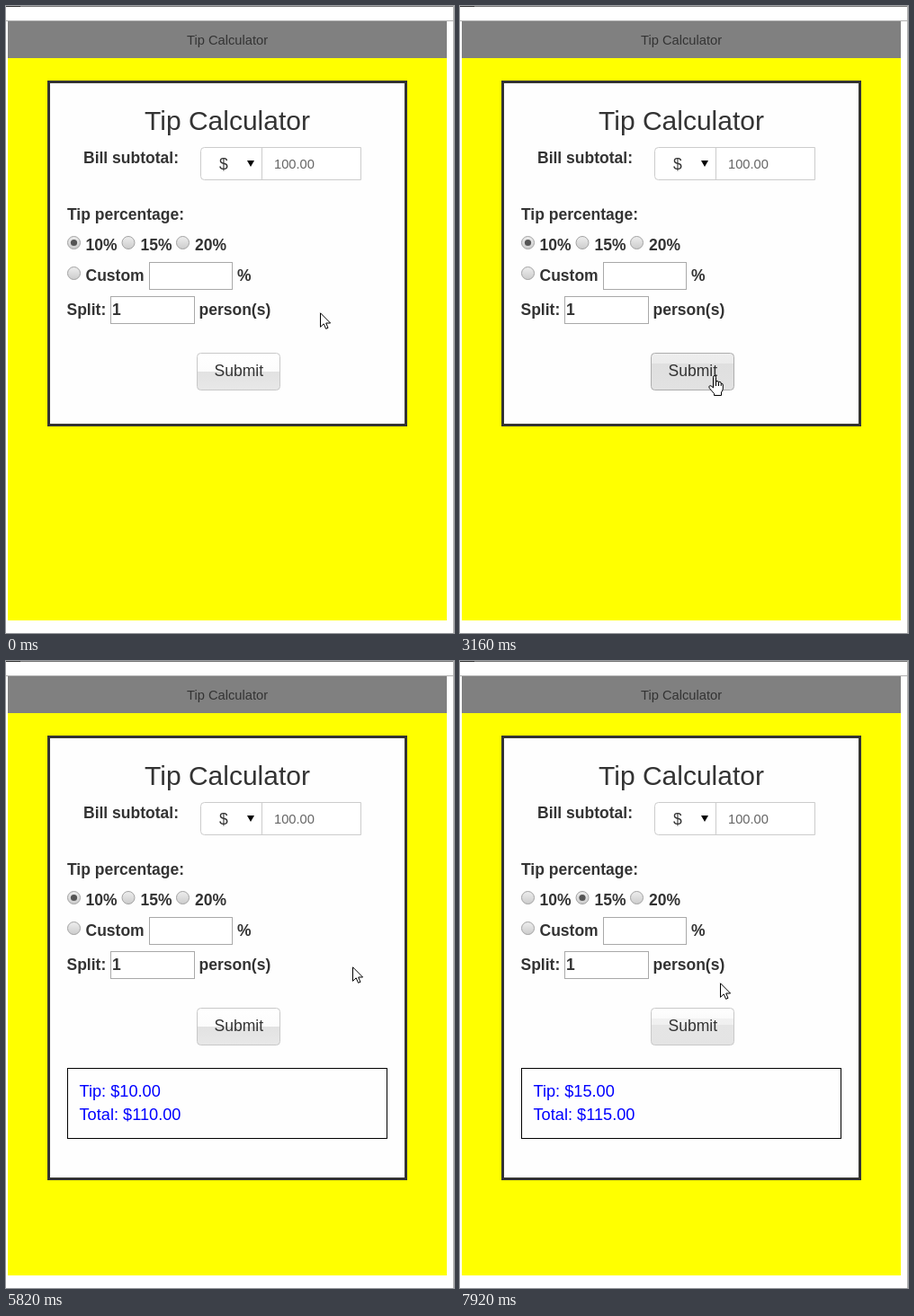
Write an HTML page that moves like this. It is 498x698 px and loops after 8 s.

```html
<!DOCTYPE html>
<html lang="en">
<head>
<meta charset="utf-8">
<title>Tip Calculator</title>
<style>
  html, body { margin: 0; width: 100%; height: 100%; overflow: hidden; background: #fff; }
  svg { display: block; width: 100%; height: 100%; }
  text { font: 17.5px "Liberation Sans", Arial, sans-serif; fill: #333; }
  .bold { font-weight: bold; }
  .small { font-size: 14.7px; }
  .title { font-size: 30px; }
  .result text { font-size: 18.2px; fill: #00f; }
  .mid { text-anchor: middle; }
  .field { fill: #fff; stroke: #a9a9a9; }
  .cursor { fill: #fff; stroke: #000; stroke-linejoin: round; }
</style>
</head>
<body>
<svg viewBox="0 0 498 698">
  <defs>
    <linearGradient id="normal" x2="0" y2="1">
      <stop offset="0" stop-color="#fff"/><stop offset=".5" stop-color="#fcfcfc"/>
      <stop offset=".5" stop-color="#e2e2e2"/><stop offset="1" stop-color="#e8e8e8"/>
    </linearGradient>
    <linearGradient id="hover" x2="0" y2="1">
      <stop offset="0" stop-color="#eee"/><stop offset=".28" stop-color="#ebebeb"/>
      <stop offset=".28" stop-color="#dfdfdf"/><stop offset="1" stop-color="#e2e2e2"/>
    </linearGradient>
    <linearGradient id="fading" x2="0" y2="1">
      <stop offset="0" stop-color="#fff"/><stop offset=".27" stop-color="#fafafa"/>
      <stop offset=".27" stop-color="#f1f1f1"/><stop offset=".45" stop-color="#f0f0f0"/>
      <stop offset=".45" stop-color="#e5e5e5"/><stop offset="1" stop-color="#e4e4e4"/>
    </linearGradient>
    <linearGradient id="pressed" x2="0" y2="1">
      <stop offset="0" stop-color="#c4c4c4"/><stop offset=".15" stop-color="#d8d8d8"/>
      <stop offset="1" stop-color="#dcdcdc"/>
    </linearGradient>
    <linearGradient id="knob" x2="0" y2="1">
      <stop offset="0" stop-color="#eee"/><stop offset="1" stop-color="#ccc"/>
    </linearGradient>
  </defs>

  <rect width="498" height="698" fill="#fff"/>
  <path d="M0 .5H498" stroke="#777"/>
  <path d="M0 .5H16" stroke="#333"/>
  <path d="M0 16.5H498M497.5 0V698" stroke="#b0b0b0"/>
  <rect x="2" y="17" width="488" height="667" fill="#ff0"/>
  <rect x="2" y="17" width="488" height="41" fill="#808080"/>
  <text class="small mid" x="246" y="43">Tip Calculator</text>

  <rect id="card" x="47.5" y="84.5" width="397" fill="#fefefe" stroke="#333" stroke-width="3"/>
  <text class="title mid" x="246" y="138">Tip Calculator</text>
  <text class="bold" x="86" y="175">Bill subtotal:</text>
  <path d="M394.5 157.5H220.5a4 4 0 0 0-4 4V189.5a4 4 0 0 0 4 4H394.5zM284.5 157.5V193.5" fill="#fff" stroke="#ccc"/>
  <text x="237" y="182">$</text>
  <path d="M268 172H276L272 179z"/>
  <text class="small" x="298" y="181" style="fill:#666">100.00</text>

  <text class="bold" x="68" y="238">Tip percentage:</text>
  <g id="radios"></g>
  <text class="bold" x="88.5" y="272">10%</text>
  <text class="bold" x="149.5" y="272">15%</text>
  <text class="bold" x="210" y="272">20%</text>
  <text class="bold" x="88.5" y="306">Custom</text>
  <rect class="field" x="159.5" y="285.5" width="92" height="30"/>
  <text class="bold" x="257" y="306">%</text>
  <text class="bold" x="67.5" y="344">Split:</text>
  <rect class="field" x="116.5" y="323.5" width="93" height="30"/>
  <text class="bold" x="118" y="344">1</text>
  <text class="bold" x="214.5" y="344">person(s)</text>

  <rect id="glow" x="212" y="386" width="93" height="42.5" rx="4" fill="none" stroke="#9dbdf2" stroke-width="2.4"/>
  <rect id="button" x="212.5" y="386.5" width="92" height="41" rx="4"/>
  <text class="mid" x="258.8" y="412">Submit</text>

  <g class="result" id="result">
    <rect x="68.5" y="453.5" width="355" height="78" fill="none" stroke="#000"/>
    <text id="tip" x="81.5" y="485"></text>
    <text id="total" x="81.5" y="511"></text>
  </g>

  <g id="cursor">
    <path class="cursor" id="arrow" d="M.5.8V16.3L4.2 12.8 6.6 18.3 9 17.3 6.7 12H11.6z"/>
    <path class="cursor" id="hand" d="M5.5 14V2.2Q5.5.5 7 .5T8.5 2.2V8Q8.5 6.5 10 6.5T11.5 8.2Q11.7 7.3 12.8 7.3 14.2 7.4 14.2 9.3 16.3 8.8 16.3 11V15Q16.2 17 14.5 19V22.5H6.5V20.5L1.3 14.5Q.2 12.6 1.5 11.8 2.8 11.3 4 12.6zM8.5 8V12M11.5 8.2V12M14.2 9.3V12"/>
    <path id="ibeam" d="M0 .5H3M4 .5H7M3.5 1V15M0 15.5H3M4 15.5H7" stroke="#000"/>
  </g>
</svg>
<script>
const $ = id => document.getElementById(id);
const LOOP = 8000;

// time, cursor x, cursor y, cursor shape, button state
const path = [
  [0, 349, 341, 'arrow', 'normal'],
  [1490, 346, 341, 'arrow', 'normal'],
  [1890, 345, 343, 'arrow', 'normal'],
  [2330, 334, 280, 'arrow', 'normal'],
  [2480, 329, 264, 'arrow', 'normal'],
  [2750, 311, 338, 'arrow', 'normal'],
  [2880, 285, 398, 'hand', 'hover'],
  [3030, 279, 407, 'hand', 'hover'],
  [3160, 276, 411, 'hand', 'hover'],
  [3430, 276, 411, 'hand', 'pressed'],
  [3550, 281, 404, 'hand', 'focus'],
  [3700, 380, 351, 'arrow', 'focus'],
  [3830, 392, 343, 'arrow', 'normal'],
  [5820, 385, 340, 'arrow', 'normal'],
  [5950, 274, 315, 'arrow', 'normal'],
  [6100, 208, 280, 'arrow', 'normal'],
  [6230, 174, 268, 'arrow', 'normal'],
  [6500, 144, 268, 'arrow', 'normal'],
  [6660, 142, 268, 'arrow', 'normal'],
  [6930, 150, 270, 'arrow', 'normal'],
  [7050, 181, 282, 'ibeam', 'normal'],
  [7200, 264, 368, 'arrow', 'normal'],
  [7360, 250, 393, 'hand', 'hover'],
  [7510, 245, 399, 'hand', 'hover'],
  [7650, 245, 399, 'hand', 'pressed'],
  [7770, 245, 399, 'hand', 'focus'],
  [7920, 289, 358, 'arrow', 'fading']
];

$('radios').innerHTML = [[75.5, 263.5], [136, 263.5], [196.5, 263.5], [75.5, 297.5]].map(([x, y]) =>
  `<g><circle cx="${x}" cy="${y}" r="7" fill="url(#knob)" stroke="#a2a2a2"/>
  <circle cx="${x}" cy="${y}" r="3.6" fill="#555"/></g>`).join('');
const radios = [...$('radios').children];

const show = (el, on) => el.setAttribute('visibility', on ? 'visible' : 'hidden');

function draw(t) {
  const [, x, y, shape, state] = path.findLast(step => step[0] <= t);
  $('cursor').setAttribute('transform', `translate(${x} ${y})`);
  for (const name of ['arrow', 'hand', 'ibeam']) show($(name), name === shape);

  const focused = state === 'focus' || state === 'pressed';
  show($('glow'), focused);
  $('button').setAttribute('fill', `url(#${state === 'focus' ? 'hover' : state})`);
  $('button').setAttribute('stroke', focused ? '#7d93bd' : state === 'hover' ? '#adadad' : '#c8c8c8');

  const choice = t < 6810 ? 0 : 1;
  const hovered = t >= 6230 && t < 7050;
  radios.forEach((radio, i) => {
    show(radio.lastChild, i === choice);
    radio.firstChild.setAttribute('stroke', i === 1 && hovered ? '#808080' : '#a2a2a2');
  });

  const submitted = t >= 3830;
  const tip = t < 7920 ? 10 : 15;
  $('card').setAttribute('height', submitted ? 492 : 382);
  show($('result'), submitted);
  $('tip').textContent = `Tip: $${tip.toFixed(2)}`;
  $('total').textContent = `Total: $${(100 + tip).toFixed(2)}`;
}

const start = performance.now();
function tick() {
  draw((performance.now() - start) % LOOP);
  requestAnimationFrame(tick);
}
tick();
</script>
</body>
</html>
```
